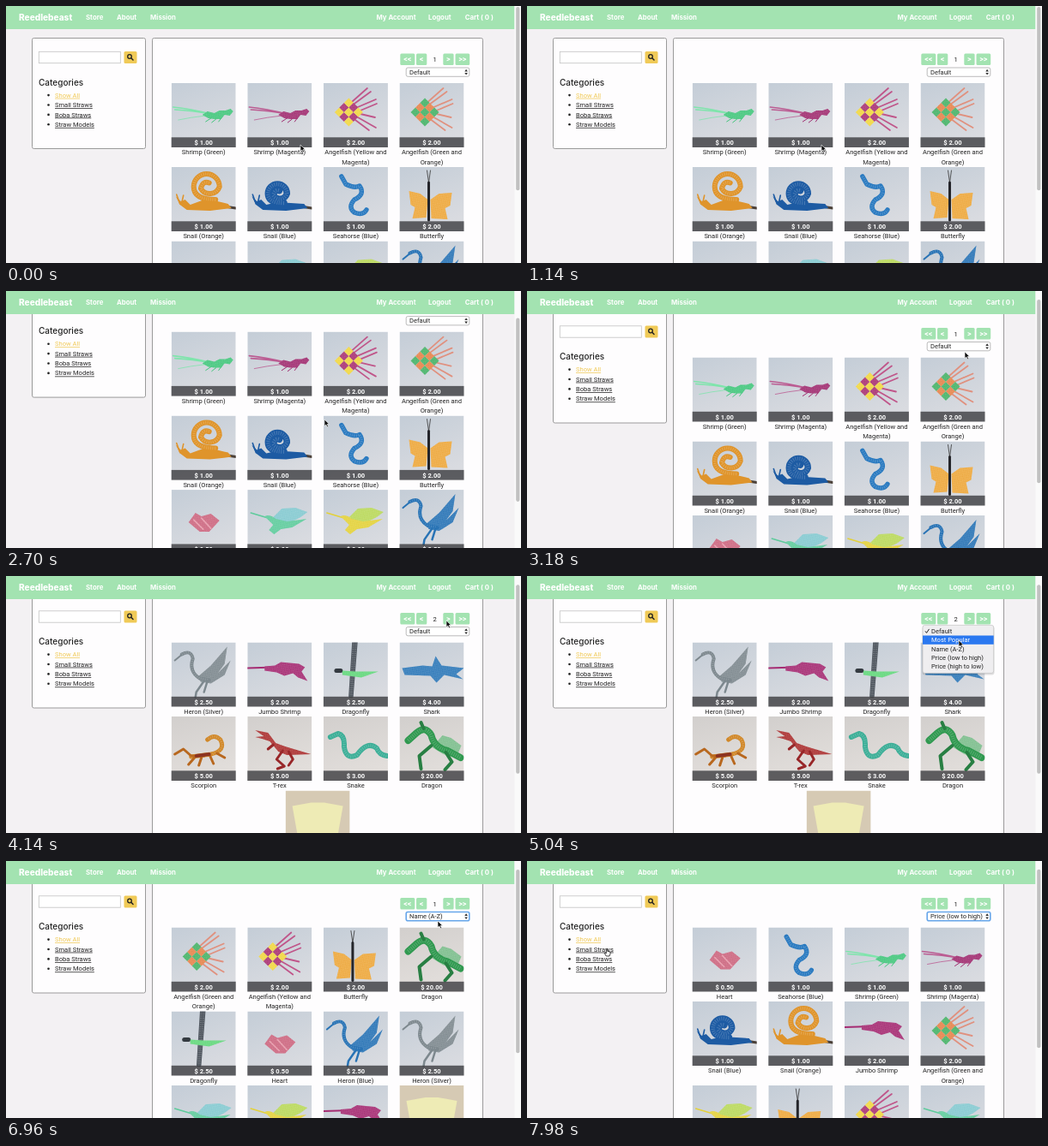
These frames come from a looping animation (600 px wide and 300 px high, 8 s). An HTML page:

```html
<!DOCTYPE html>
<html lang="en">
<head>
<meta charset="utf-8">
<title>Straw animal shop</title>
<style>
html, body { margin: 0; width: 100%; height: 100%; overflow: hidden; background: #f3f1f3; }
svg { display: block; }
text { font: 7.55px Roboto, sans-serif; fill: #222; white-space: pre; }
.nav { font: 700 7.8px Inter, sans-serif; fill: #fff; }
.brand { font-size: 10.1px; font-weight: 800; }
.heading { font: 500 10px Inter, sans-serif; }
.link { text-decoration: underline; }
.price { font-weight: 700; fill: #fff; }
.mid { text-anchor: middle; }
.arrow { font-weight: 700; font-size: 9px; fill: #fff; }
</style>
</head>
<body>
<svg id="stage" width="600" height="300" viewBox="0 0 600 300"></svg>
<script>
const LOOP = 8000, STEP = 60, GREEN = '#a3e3b1', GOLD = '#f0ca57';

const text = (x, y, s, cls = '') => `<text x="${x}" y="${y}" class="${cls}">${s.replace(/</g, '&lt;')}</text>`;
const rect = (x, y, w, h, fill, extra = '') => `<rect x="${x}" y="${y}" width="${w}" height="${h}" fill="${fill}" ${extra}/>`;
const shape = (d, fill) => `<path d="${d}" fill="${fill}"/>`;
const line = (d, color, w = 1) => `<path d="${d}" fill="none" stroke="${color}" stroke-width="${w}" stroke-linecap="round" stroke-linejoin="round"/>`;
// A straw: solid stroke with a ribbed highlight
const straw = (d, color, w) => line(d, color, w) +
  `<path d="${d}" fill="none" stroke="#fff" stroke-opacity=".18" stroke-width="${w * .6}" stroke-dasharray="1 1.5"/>`;
const woven = (d, color) => shape(d, color) + shape(d, 'url(#weave)');

const shrimp = (body, feeler) =>
  line('M2 28Q22 30 46 36M4 31Q24 32 46 36', feeler, 1.6) + line('M8 43Q22 40 40 38', feeler, .8) +
  woven('M36 37L42 33L50 35L56 32L63 32L69 30L72 33L68 38L62 37L58 42L50 42L43 41Z', body) +
  line('M46 41L40 45M52 42L47 46M58 41L55 45', body);

function angelfish(a, b, fin) {
  let s = line('M33 22L51 6M36 24L55 10M40 28L61 19M43 32L62 24M43 36L60 40M40 40L61 52M37 43L53 55', fin, 1.8);
  for (let i = 0; i < 9; i++) {
    const u = i % 3, v = i / 3 | 0;
    s += woven(`M${13 + 5.5 * (u + v)} ${34 + 5.5 * (v - u)}l5.5 -5.5l5.5 5.5l-5.5 5.5z`, i % 2 ? a : b);
  }
  return s;
}

const snail = (color, x, y, r, w) =>
  line('M62 46L75 48', '#4b4038', 3) +
  shape(`M5 34L11 40L16 38L22 44L${x} ${y + r - 1}L66 43L70 48L45 51L18 50L10 44Z`, color) +
  line('M10 43L6 32M12 42L14 33', color, 1.6) +
  straw(`M${x + r * .7} ${y + r}Q${x - r} ${y + r} ${x - r} ${y}A${r} ${r} 0 1 1 ${x + r} ${y}A${r * .8} ${r * .8} 0 0 1 ${x - r * .45} ${y + 2}Q${x - r * .3} ${y - r * .5} ${x + r * .2} ${y - r * .3}`, color, w);

const hummingbird = (color, tip) =>
  line('M4 27L24 33', color, 1.6) +
  woven('M28 34L40 22L56 21L70 26L62 32L48 39Z', tip) +
  woven('M20 31Q26 28 33 34L46 37L69 34L52 44L39 46L31 52L25 47L30 41Z', color);

const heron = color =>
  line('M4 21L15 12', color, 2) +
  woven('M31 40L46 27L65 5L62 25L54 36L69 21L62 38L46 48L34 46Z', color) +
  straw('M12 14Q23 8 25 19Q20 34 33 42L44 44', color, 4) +
  line('M38 45L29 58L28 64M42 45L38 58', color, 2.5);

const ART = {
  shrimpGreen: shrimp('#43c67c', '#7fe5ac'),
  shrimpPink: shrimp('#a02d70', '#bb5c92'),
  fishYellow: angelfish('#a93272', '#f0d640', '#c0568a'),
  fishGreen: angelfish('#e5834a', '#45b266', '#e0917f'),
  snailOrange: snail('#df942b', 41, 23, 15, 6),
  snailBlue: snail('#1d5ba3', 35, 31, 11, 7.5),
  seahorse: straw('M21 11L26 20Q36 25 42 22Q49 32 36 38Q28 47 36 53Q46 57 50 50', '#2a7ac0', 5.5),
  butterfly: woven('M33 38L24 31L11 28L13 44L18 47L15 60L31 59ZM36 38L46 31L61 30L59 45L53 48L56 61L37 60Z', '#eda73b') +
    line('M32 4L34 18L36 4', '#333', .8) + line('M34 18L34 62', '#24252a', 3),
  heart: woven('M20 38L28 27L35 31L46 28L56 36L44 49L33 49Z', '#cc667f') +
    line('M26 35L37 46M35 33L46 45', '#e9a3b2', 1.6),
  birdGreen: hummingbird('#5ecb9c', '#84c9d0'),
  birdYellow: hummingbird('#e3d13a', '#b9d85a'),
  heronBlue: heron('#2873b5'),
  heronSilver: heron('#7d888e'),
  jumbo: line('M0 30L32 29', '#a52b72', 2) +
    woven('M20 28L32 27L39 23L60 25L67 29L63 34L70 45L59 41L53 36L43 39L34 35L20 33Z', '#a52b72'),
  dragonfly: straw('M35 0L31 63M38 0L33 63', '#515861', 3.5) + line('M15 33L20 33', '#343a40', 5) +
    woven('M22 33L38 34L64 34L44 41L22 38Z', '#62d77b'),
  shark: woven('M3 30L27 27L38 28L42 16L49 27L75 30L66 37L74 43L52 38L43 47L36 39L6 38Z', '#2d78b8'),
  scorpion: straw('M23 47L46 44Q64 40 57 27Q50 20 42 27', '#d18829', 5) +
    line('M4 44L14 38L23 46L38 46M27 48L20 56M35 48L32 57M45 46L49 55M53 43L62 48', '#b8681f', 3) +
    line('M29 46L44 44', '#8c3422', 4),
  trex: woven('M9 16L24 19L33 31L44 35L74 44L46 45L36 41L26 29L17 26L9 24L19 23Z', '#ab3030') +
    line('M41 40L34 50L43 58L35 61M48 41L53 50L48 57M30 33L24 38', '#982729', 3),
  snake: straw('M8 24L17 20Q25 22 24 35Q26 51 39 45Q51 28 62 37Q65 45 74 46', '#3cae97', 6),
  dragon: woven('M38 36L50 22L60 25L72 34L66 48L51 44Z', '#7cbd8c') +
    straw('M10 28L20 19Q30 10 37 22Q40 36 56 40L71 48', '#309950', 8) +
    line('M37 34L23 46L25 61M54 42L61 53L53 62M28 14L25 7', '#287f43', 4),
  robot: shape('M8 18L30 14L45 14L67 18L59 63L16 63Z', '#eeebb5')
};
const WARM = ['scorpion', 'trex', 'snake', 'dragon'];

// art: [label, price]
const ITEMS = {
  shrimpGreen: ['Shrimp (Green)', 1], shrimpPink: ['Shrimp (Magenta)', 1],
  fishYellow: ['Angelfish (Yellow and|Magenta)', 2], fishGreen: ['Angelfish (Green and|Orange)', 2],
  snailOrange: ['Snail (Orange)', 1], snailBlue: ['Snail (Blue)', 1],
  seahorse: ['Seahorse (Blue)', 1], butterfly: ['Butterfly', 2],
  heart: ['Heart', .5], birdGreen: ['Hummingbird (Green)', 2], birdYellow: ['Hummingbird (Yellow)', 2],
  heronBlue: ['Heron (Blue)', 2.5], heronSilver: ['Heron (Silver)', 2.5],
  jumbo: ['Jumbo Shrimp', 2], dragonfly: ['Dragonfly', 2.5], shark: ['Shark', 4],
  scorpion: ['Scorpion', 5], trex: ['T-rex', 5], snake: ['Snake', 3], dragon: ['Dragon', 20], robot: ['Robot', 25]
};
const OPTIONS = ['Default', 'Most Popular', 'Name (A-Z)', 'Price (low to high)', 'Price (high to low)'];
const VIEWS = [
  { at: 0, page: 1, sort: 0, list: 'shrimpGreen shrimpPink fishYellow fishGreen snailOrange snailBlue seahorse butterfly heart birdGreen birdYellow heronBlue' },
  { at: 3480, page: 2, sort: 0, list: 'heronSilver jumbo dragonfly shark scorpion trex snake dragon robot' },
  { at: 5100, page: 1, sort: 1, list: 'fishGreen snake heronSilver snailBlue shark scorpion dragon fishYellow heronBlue robot birdGreen butterfly' },
  { at: 6000, page: 1, sort: 2, list: 'fishGreen fishYellow butterfly dragon dragonfly heart heronBlue heronSilver birdGreen birdYellow jumbo robot' },
  { at: 7320, page: 1, sort: 3, list: 'heart seahorse shrimpGreen shrimpPink snailBlue snailOrange jumbo fishGreen birdYellow butterfly fishYellow birdGreen' }
];
const MENUS = [[4680, 5100], [5580, 6000], [7020, 7320]];
const SCROLL = [[0, 0], [1680, 0], [2280, 107], [2400, 107], [2880, 12.5]];
const CURSOR = [
  [0, 343, 162], [1380, 343, 162], [1740, 371, 150], [2700, 371, 150], [3120, 510, 71], [3240, 510, 71],
  [3420, 513, 52], [4200, 513, 52], [4560, 505, 65], [4740, 505, 65], [4980, 503, 75], [5160, 503, 75],
  [5460, 503, 65], [5640, 503, 65], [5820, 503, 74], [6120, 503, 74], [6480, 503, 70], [7080, 503, 70],
  [7260, 505, 76], [7560, 505, 76], [7920, 93, 102]
];

function at(keys, t) {
  const i = keys.findIndex(k => k[0] > t);
  if (i < 0) return keys[keys.length - 1].slice(1);
  const a = keys[i - 1], b = keys[i], p = (t - a[0]) / (b[0] - a[0]), e = p * p * (3 - 2 * p);
  return a.slice(1).map((v, n) => v + (b[n + 1] - v) * e);
}

function grid(view) {
  const names = view.list.split(' ');
  let y = 90, out = '';
  for (let r = 0; r < names.length; r += 4) {
    const row = names.slice(r, r + 4);
    let lines = 1;
    row.forEach((name, c) => {
      const x = 363.1 + (c - (row.length - 1) / 2) * 88.6 - 37.5;
      const [label, price] = ITEMS[name], parts = label.split('|');
      lines = Math.max(lines, parts.length);
      out += `<use href="#${name}" x="${x}" y="${y}" width="75" height="75"/>` +
        rect(x, y + 63.3, 75, 11.7, '#3c3d40', 'opacity=".8"') +
        text(x + 37.5, y + 72.2, '$ ' + price.toFixed(2), 'price mid') +
        parts.map((p, i) => text(x + 37.5, y + 83.2 + 11.5 * i, p, 'mid')).join('');
    });
    y += 75 + 11.5 * lines;
  }
  view.height = y + 55;
  return `<g class="grid">${rect(170.5, 37.5, 385, y - 27, '#fefdfe', 'stroke="#9a9a9a" rx="2"')}${out}</g>`;
}

const pagerButton = (x, w, s) => rect(x, 55.5, w, 13.5, GREEN, 'rx="1.5"') + text(x + w / 2, 65.4, s, 'arrow mid');
const links = ['Show All', 'Small Straws', 'Boba Straws', 'Straw Models'].map((s, i) => {
  const y = 106.7 + i * 11.4;
  return `<circle cx="49.5" cy="${y - 2.6}" r="1.3" fill="#222"/>` +
    text(57, y, s, 'link').replace('<text', i ? '<text' : `<text style="fill:${GOLD}"`);
}).join('');

const stage = document.getElementById('stage');
stage.innerHTML = `
<defs>
  <linearGradient id="cool" x2=".4" y2="1"><stop stop-color="#c4cdd7"/><stop offset="1" stop-color="#d9dbe0"/></linearGradient>
  <linearGradient id="warm" x2=".3" y2="1"><stop stop-color="#d2cfcd"/><stop offset="1" stop-color="#e2dedb"/></linearGradient>
  <pattern id="weave" width="3" height="3" patternUnits="userSpaceOnUse" patternTransform="rotate(35)">
    <path d="M0 0h1.5v1.5h-1.5zM1.5 1.5h1.5v1.5h-1.5z" fill="#fff" opacity=".2"/></pattern>
  ${Object.keys(ART).map(k => `<symbol id="${k}" viewBox="0 0 75 75">${
    rect(0, 0, 75, 75, k === 'robot' ? '#d6cab4' : `url(#${WARM.includes(k) ? 'warm' : 'cool'})`)}${ART[k]}</symbol>`).join('')}
</defs>
${rect(0, 0, 600, 300, '#f3f1f3')}
<g id="page">
  ${rect(30.5, 37.5, 132, 129, '#fefdfe', 'stroke="#9a9a9a" rx="2"')}
  ${rect(38.3, 53.3, 95, 13.4, '#fff', 'stroke="#c4c4c4" stroke-width=".8"')}
  ${rect(137.5, 53, 15, 14, GOLD, 'rx="1.5"')}
  <circle cx="144" cy="59" r="2.3" fill="none" stroke="#222" stroke-width="1.3"/>${line('M146 61L148 63', '#222', 1.5)}
  ${text(38, 92.5, 'Categories', 'heading')}${links}
  ${VIEWS.map(grid).join('')}
  ${pagerButton(459.3, 17, '<<')}${pagerButton(478, 12.3, '<')}${pagerButton(509.3, 12.3, '>')}${pagerButton(523.5, 16.7, '>>')}
  <text id="pageNo" class="mid" x="499.7" y="65"></text>
  <rect id="select" x="466.2" y="72" width="73.6" height="10.3" rx="2" fill="#fff"/>
  <text id="sort" x="470" y="79.8"></text>
  ${shape('M534.3 76.4l1.8 -2.6l1.8 2.6zM534.3 78l1.8 2.6l1.8 -2.6z', '#333')}
</g>
${rect(0, 0, 592.5, 27, GREEN)}
${text(15, 16.5, 'Reedlebeast', 'nav brand')}
${[[93, 'Store'], [129, 'About'], [168, 'Mission'], [431.5, 'My Account'], [492, 'Logout'], [534.7, 'Cart ( 0 )']]
  .map(([x, s]) => text(x, 15.8, s, 'nav')).join('')}
${rect(592.5, 0, 7.5, 300, '#fafafa')}
<rect id="thumb" x="594.2" width="4.2" rx="2.1" fill="#c1c1c1"/>
<g id="menu">
  ${rect(460.5, 1, 84, 57, '#000', 'rx="3" opacity=".12"')}
  ${rect(461, 0, 82.7, 56, '#efeef0', 'rx="2.5" stroke="#bbb" stroke-width=".6"')}
  ${rect(461, 0, 82.7, 10.3, '#2a78f0', 'id="hover"')}
  ${OPTIONS.map((s, i) => text(471, 9.7 + 10.3 * i, s, 'option')).join('')}
  <path id="check" d="M464 0l1.5 2l3 -4.5" fill="none" stroke="#222"/>
</g>
<g id="cursor">
  <path id="pointer" d="M0 0V7.6L1.8 6L3.1 8.8L4.5 8.2L3.2 5.5H5.6Z" fill="#111" stroke="#fff" stroke-width=".6"/>
  <path id="hand" d="M-.7 .6Q0 -.5 .7 .6V3.3L4 4V6.5L3 9H-.7L-2.8 5.6Q-2.5 4.6 -.7 5.8Z" fill="#fff" stroke="#111" stroke-width=".8"/>
</g>`;

const $ = id => document.getElementById(id);
const grids = document.querySelectorAll('.grid'), options = document.querySelectorAll('.option');
const show = (el, on) => el.setAttribute('display', on ? 'inline' : 'none');
const set = (id, attrs) => { for (const k in attrs) $(id).setAttribute(k, attrs[k]); };

function draw(t) {
  const view = VIEWS.filter(v => v.at <= t).pop();
  const [scroll] = at(SCROLL, t), [x, y] = at(CURSOR, t);
  set('page', { transform: `translate(0 ${-scroll})` });
  grids.forEach((g, i) => show(g, VIEWS[i] === view));
  $('pageNo').textContent = view.page;
  $('sort').textContent = OPTIONS[view.sort];
  set('select', { stroke: view.sort ? '#67a6ea' : '#aaa', 'stroke-width': view.sort ? 1.6 : .8 });
  set('thumb', { y: scroll * 300 / view.height + 1, height: 90000 / view.height - 2 });

  const open = MENUS.some(([a, b]) => t >= a && t < b), top = 57.4 - 10.3 * view.sort;
  const hover = Math.max(0, Math.min(4, Math.floor((y - top - 1.8) / 10.3)));
  show($('menu'), open);
  set('menu', { transform: `translate(0 ${top})` });
  set('hover', { y: 1.8 + 10.3 * hover });
  set('check', { transform: `translate(0 ${7 + 10.3 * view.sort})`, stroke: hover === view.sort ? '#fff' : '#222' });
  options.forEach((o, i) => o.style.fill = i === hover ? '#fff' : '#222');

  const overLink = x > 57 && x < 103 && y < 140 && y > 98;
  set('cursor', { transform: `translate(${x} ${y})` });
  show($('hand'), overLink);
  show($('pointer'), !overLink);
}

const start = performance.now();
function tick() {
  const t = Math.max(0, performance.now() - start) % LOOP;
  draw(Math.floor(t / STEP) * STEP);
  requestAnimationFrame(tick);
}
tick();
</script>
</body>
</html>
```
